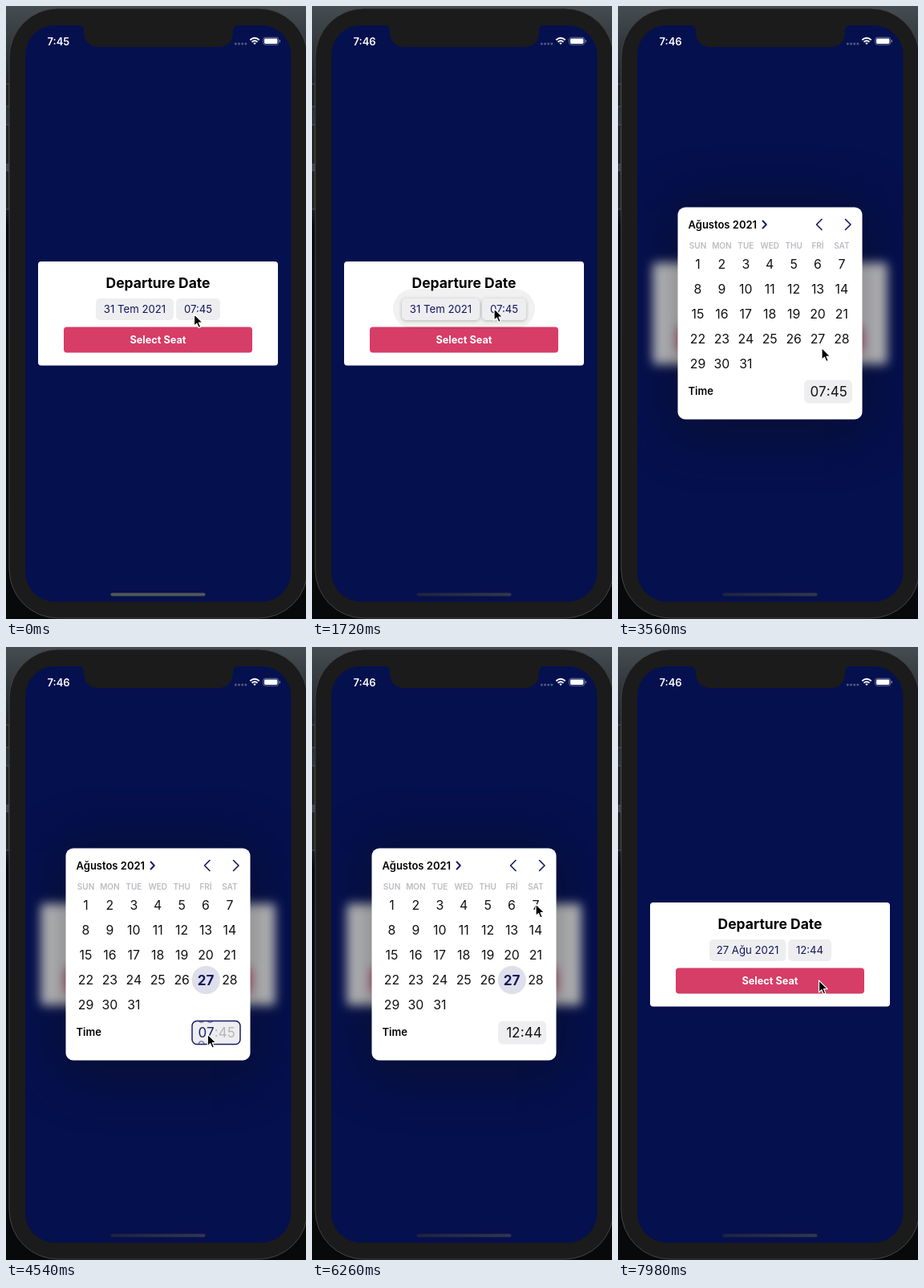
Write an HTML page that moves like this. It is 374x763 px and loops after 8 s.

```html
<!DOCTYPE html>
<html lang="en">
<head>
<meta charset="utf-8">
<title>Departure date picker</title>
<style>
  html, body { margin: 0; width: 100%; height: 100%; overflow: hidden; background: #111; }
  svg { display: block; width: 100vw; height: 100vh; font-family: Inter, "Liberation Sans", sans-serif; cursor: default; }
  .mid { text-anchor: middle; }
  .semi { font-weight: 600; }
  .bold { font-weight: 700; }
  .chev { fill: none; stroke: #141a63; stroke-linecap: round; stroke-linejoin: round; }
</style>
</head>
<body>
<svg viewBox="0 0 374 763">
  <defs>
    <linearGradient id="desk" x2="0" y2="1">
      <stop offset="0" stop-color="#454d52"/><stop offset=".12" stop-color="#20262a"/>
      <stop offset=".27" stop-color="#3c474b"/><stop offset=".36" stop-color="#05080a"/>
      <stop offset="1" stop-color="#08090a"/>
    </linearGradient>
    <linearGradient id="bar"><stop offset="0" stop-color="#20233f"/><stop offset="1" stop-color="#34374c"/></linearGradient>
    <clipPath id="screenClip"><rect x="24" y="24" width="331.500" height="717.500" rx="37"/></clipPath>
    <clipPath id="gridClip"><rect x="75" y="304" width="229.500" height="161"/></clipPath>
    <clipPath id="fieldClip"><rect x="233" y="466" width="58" height="28" rx="5"/></clipPath>
  </defs>

  <rect width="374" height="763" fill="url(#desk)"/>
  <g fill="#222" stroke="#5b6366" stroke-width=".8">
    <path d="M-1 97H4V125H-1ZM-1 148H4V197H-1ZM-1 205H4V253H-1Z"/>
  </g>
  <rect x="4" y="3" width="372" height="759" rx="61" fill="#1b1b1b" stroke="#414446"/>
  <g clip-path="url(#screenClip)">
    <rect x="24" y="24" width="332" height="718" fill="#05104e"/>
    <g id="card">
      <rect x="40" y="318" width="299" height="129.500" rx="4" fill="#fff"/>
      <rect x="72" y="399.500" width="235" height="32" rx="4" fill="#d63d67"/>
      <text class="mid bold" x="189.500" y="351" font-size="17.500">Departure Date</text>
      <text class="mid bold" x="189.500" y="420" font-size="12.700" fill="#fff">Select Seat</text>
      <rect id="halo" x="101" y="352" width="177" height="50" rx="25" fill="#000"/>
      <g id="pills" font-size="13.200" fill="#10175f">
        <rect id="datePill" y="364" height="27" rx="5" fill="#eeeef0"/>
        <rect id="timePill" x="212" y="364" height="27" rx="5" fill="#eeeef0"/>
        <text id="dateText" class="mid" y="382"/>
        <text id="timeText" class="mid" y="382"/>
      </g>
    </g>
    <rect id="shade" x="62" y="240" width="255" height="300" rx="30" fill="#0a0d14" style="filter:blur(32px)"/>
    <g id="popup">
      <rect x="74.500" y="250.500" width="230" height="264" rx="9.500" fill="#fff"/>
      <text id="month" class="semi" x="87.500" y="277" font-size="13"/>
      <path id="more" class="chev" d="M180.500 267.500l4.300 4.500-4.300 4.500" stroke-width="1.900"/>
      <path class="chev" d="M254 265.500l-6.500 6.500 6.500 6.500" stroke-width="1.600"/>
      <path id="next" class="chev" d="M283.500 265.500l6.500 6.500-6.500 6.500" stroke-width="1.600"/>
      <g id="week" class="mid semi" font-size="10" fill="#bcbcc1"></g>
      <g clip-path="url(#gridClip)">
        <g id="july" class="mid" font-size="15.800" fill="#d3d3d6">
          <circle cx="278" cy="445.700" r="17.800" fill="#0a1152"/>
        </g>
        <g id="august" class="mid" font-size="15.800" fill="#111">
          <circle id="spot" cx="249.300" cy="414.500" r="17.600" fill="#dfdfeb"/>
        </g>
      </g>
      <text class="semi" x="87.500" y="484" font-size="13">Time</text>
      <rect id="field" x="232" y="465.500" width="60" height="29" rx="6" fill="#eeeef0" stroke="#141c66" stroke-width="1.500"/>
      <g id="digits" clip-path="url(#fieldClip)" font-size="17"></g>
    </g>
    <rect id="home" x="130.500" y="730.500" width="118" height="4" rx="2"/>
    <path d="M89 23Q97 24 97 32C97 44 104 51 116 51H264C276 51 283 44 283 32Q283 24 291 23Z" fill="#1b1b1b"/>
    <text id="clock" class="semi" x="51.500" y="48.500" font-size="13" fill="#fff"/>
    <g id="dots" fill="#535a83"></g>
    <g fill="none" stroke="#fff" stroke-width="1.800">
      <path d="M304.300 42.300Q310 37.300 315.700 42.300M306.500 44.700Q310 41.700 313.500 44.700"/>
      <path d="M308.300 46L310 48.200 311.700 46Q310 44.800 308.300 46Z" fill="#fff" stroke="none"/>
      <rect x="320.700" y="39.200" width="19" height="9" rx="2.600" stroke="#8589a8" stroke-width=".8"/>
      <rect x="322" y="40.500" width="16.400" height="6.400" rx="1.400" fill="#fff" stroke="none"/>
      <path d="M341.300 42.200v3" stroke="#8589a8" stroke-width="1.200"/>
    </g>
  </g>
  <path id="cursor" d="M0 0V14.800L3.400 11.700 5.700 17 8.300 15.900 6 10.700H10.700Z" fill="#000" stroke="#fff" stroke-width="1.200" stroke-linejoin="round"/>
</svg>
<script>
const LOOP = 8000;
const $ = id => document.getElementById(id);
const set = (el, attrs) => { for (const k in attrs) el.setAttribute(k, attrs[k]); };
const add = (parent, tag, attrs, text = "") => {
  const el = document.createElementNS("http://www.w3.org/2000/svg", tag);
  set(el, attrs);
  el.textContent = text;
  return parent.appendChild(el);
};
const write = (id, text) => { if ($(id).textContent !== text) $(id).textContent = text; };
const ramp = (t, a, b) => Math.min(1, Math.max(0, (t - a) / (b - a)));
const smooth = p => p * p * (3 - 2 * p);
const easeOut = p => 1 - (1 - p) ** 3;
const pulse = (t, a, b, c, d) => ramp(t, a, b) * (1 - ramp(t, c, d));

// Pointer stops: time, x, y
const stops = [
  [0, 234.5, 383.5], [30, 234.5, 383.5], [300, 231, 388], [700, 227, 376.5],
  [2540, 227, 376.5], [2800, 288.5, 268], [2960, 288.5, 268], [3340, 256, 428],
  [3390, 254, 425.5], [3870, 254, 425.5], [4250, 252, 482], [4690, 251, 482],
  [5050, 256, 393], [5260, 256, 393], [5360, 269.5, 471], [5420, 274, 482],
  [5570, 274, 482], [5850, 276, 507], [5960, 276, 507], [6260, 279, 320],
  [6320, 279, 316], [6380, 279, 316], [6560, 286, 255], [6800, 319, 390],
  [7080, 316, 539], [7400, 316, 539], [7780, 260, 417], [7920, 260, 417], [7980, 250.5, 415]
];
function pointer(t) {
  const i = stops.findIndex(s => s[0] > t);
  if (i < 0) return stops.at(-1).slice(1);
  const [t0, x0, y0] = stops[i - 1], [t1, x1, y1] = stops[i];
  const p = smooth(ramp(t, t0, t1));
  return [x0 + (x1 - x0) * p, y0 + (y1 - y0) * p];
}

const colX = c => 99.5 + 29.9 * c;
["SUN", "MON", "TUE", "WED", "THU", "FRİ", "SAT"].forEach((d, c) => add($("week"), "text", { x: colX(c), y: 302 }, d));
function fillMonth(group, firstCol) {
  const days = [];
  for (let d = 1; d <= 31; d++) {
    const cell = d - 1 + firstCol;
    days[d] = add(group, "text", { x: colX(cell % 7), y: 327.2 + 31.05 * Math.floor(cell / 7) }, d);
  }
  return days;
}
set(fillMonth($("july"), 4)[31], { x: 277.5, y: 452, fill: "#fff", "font-weight": 600, "font-size": 17 });
const picked = fillMonth($("august"), 0)[27];
for (let i = 0; i < 4; i++) add($("dots"), "circle", { cx: 286.3 + 4.2 * i, cy: 47, r: 1.5 });

// Each wheel shows its value and a neighbour on both sides
const wheel = (x, anchor) => [-1, 0, 1].map(k => ({ k, el: add($("digits"), "text", { x, "text-anchor": anchor }) }));
const hours = wheel(259.5, "end"), minutes = wheel(264.8, "start");
const colon = add($("digits"), "text", { x: 262.2, y: 485, "text-anchor": "middle" }, ":");
const PITCH = 17.6;
function turn(parts, value, active, faded) {
  const near = Math.round(value);
  for (const { k, el } of parts) {
    el.textContent = String(near + k).padStart(2, "0");
    set(el, {
      y: 485.7 + (near + k - value) * PITCH,
      opacity: k ? active * .55 : 1 - .75 * faded,
      fill: active > .5 ? "#1a2168" : "#111"
    });
  }
}

function draw(t) {
  const open = easeOut(ramp(t, 1820, 2420)) * (1 - smooth(ramp(t, 7200, 7560)));
  const lift = t < 1720 ? 0 : 1 - smooth(ramp(t, 7450, 7720));
  const done = t > 7200;

  write("clock", t < 500 ? "7:45" : "7:46");
  set($("home"), { fill: t < 1720 ? "#555659" : "url(#bar)" });

  write("dateText", done ? "27 Ağu 2021" : "31 Tem 2021");
  write("timeText", done ? "12:44" : "07:45");
  set($("datePill"), { x: done ? 114 : 112, width: done ? 95.5 : 97 });
  set($("timePill"), { width: done ? 54 : 55 });
  set($("dateText"), { x: done ? 161.5 : 160.5 });
  set($("timeText"), { x: done ? 239 : 239.5 });
  set($("halo"), { opacity: .055 * lift });
  $("pills").style.filter = lift ? `drop-shadow(0 1px 2px rgba(0,0,0,${.25 * lift}))` : "none";

  const s = 1 - .025 * open;
  set($("card"), { transform: `translate(189.5 382.5) scale(${s}) translate(-189.5 -382.5)` });
  $("card").style.filter = open > .01 ? `blur(${6.5 * open}px) brightness(${1 - .2 * open})` : "none";
  set($("shade"), { opacity: .42 * open });
  const z = .35 + .65 * open;
  set($("popup"), {
    transform: `translate(189.5 382.5) scale(${z}) translate(-189.5 -382.5)`,
    opacity: Math.min(1, open * 1.6)
  });

  const flipped = t > 2840;
  write("month", flipped ? "Ağustos 2021" : "Temmuz 2021");
  set($("more"), { transform: `translate(${flipped ? 0 : 3} 0)` });
  set($("next"), { opacity: 1 - .5 * pulse(t, 2810, 2850, 2940, 3050) });
  const slide = smooth(ramp(t, 2880, 3270)) * 230;
  set($("july"), { transform: `translate(${-slide} 0)` });
  set($("august"), { transform: `translate(${230 - slide} 0)` });

  const choose = ramp(t, 3570, 3700);
  set($("spot"), { opacity: choose });
  set(picked, choose > .5
    ? { "font-weight": 700, fill: "#141a5e", "font-size": 17, y: 420.7 }
    : { "font-weight": 400, fill: "#111", "font-size": 15.8, y: 420.35 });

  const hourOn = pulse(t, 4330, 4480, 5365, 5420);
  const minuteOn = pulse(t, 5570, 5640, 5960, 6060);
  const [x, y] = pointer(t);
  turn(hours, 7 + 5 * smooth(ramp(t, 4690, 5050)), hourOn, minuteOn);
  turn(minutes, 45 - smooth(ramp(t, 5580, 5850)), minuteOn, hourOn);
  set(colon, { opacity: 1 - .75 * Math.max(hourOn, minuteOn), fill: "#111" });
  set($("field"), { "stroke-opacity": Math.max(hourOn, minuteOn) });

  set($("cursor"), { transform: `translate(${x} ${y})` });
}

function tick() {
  draw(performance.now() % LOOP);
  requestAnimationFrame(tick);
}
tick();
</script>
</body>
</html>
```
